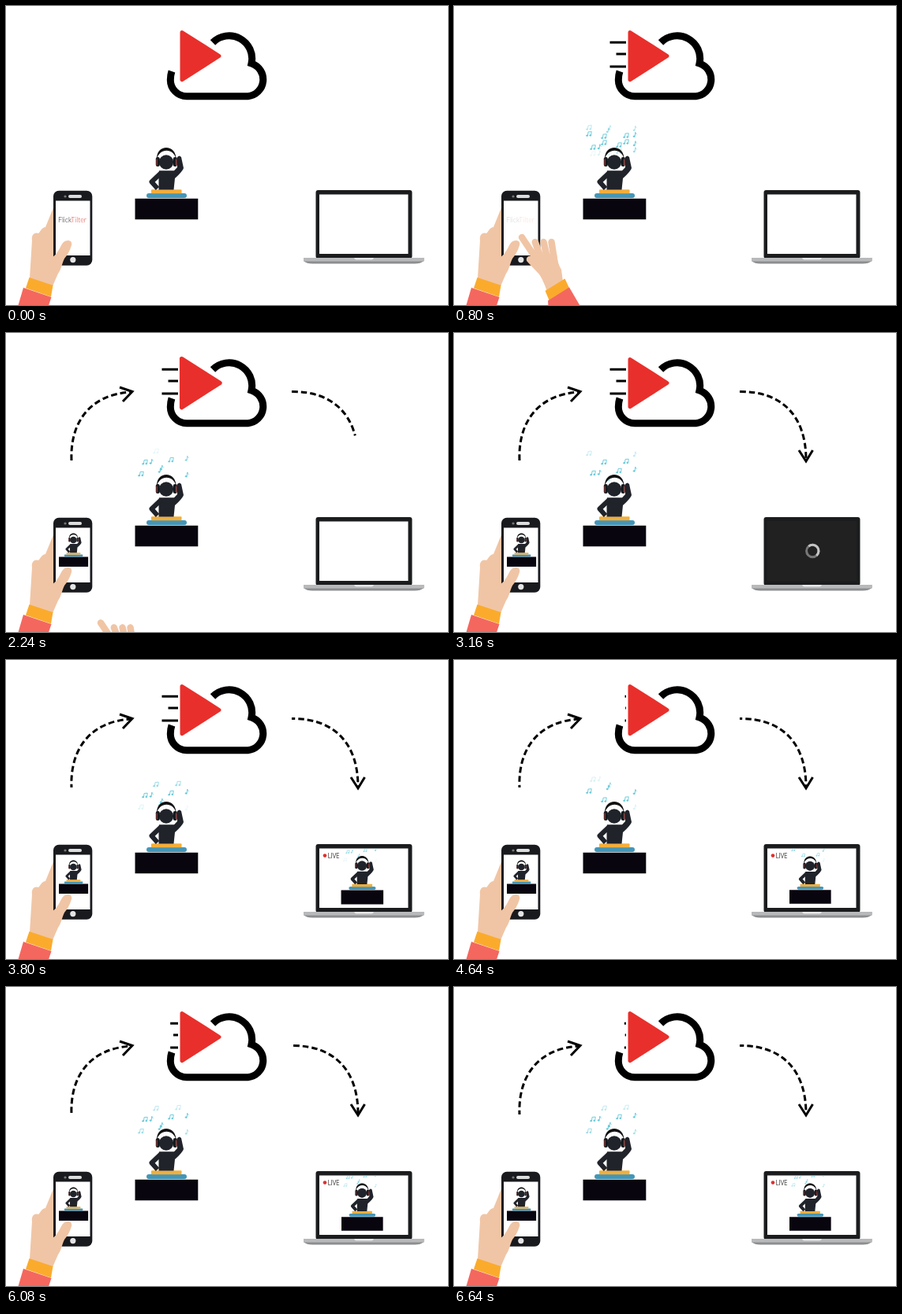
Write an HTML page that moves like this. It is 560x380 px and loops after 6.68 s.

```html
<!DOCTYPE html>
<html lang="en">
<head>
<meta charset="utf-8">
<title>Live streaming</title>
<style>
  html, body { margin: 0; width: 100%; height: 100%; overflow: hidden; background: #fff; }
  svg { display: block; width: 560px; height: 380px; }
  .name { font: 300 8.8px Lato, "Open Sans", sans-serif; }
  .live { font: 8.2px "Open Sans", Roboto, sans-serif; letter-spacing: -.3px; }
  .line { fill: none; stroke: #000; stroke-width: 3; }
  .skin { fill: #f0c5a5; }
  .finger { fill: none; stroke: #f0c5a5; stroke-width: 8.5; stroke-linecap: round; }
</style>
</head>
<body>
<svg viewBox="0 0 560 380">
  <defs>
    <g id="dj">
      <path d="M163.500 244.700h79.800v26.600h-79.800z" fill="#08050f"/>
      <rect x="178" y="238" width="51" height="6" rx="3" fill="#4596b7"/>
      <rect x="184" y="233.200" width="38.500" height="5" rx="1" fill="#f3ae3a"/>
      <g fill="#20232a">
        <path d="M194 209.300H213L217 205L216.500 193Q219 188.500 222 192L225 206Q224 210 214 219L212.500 233.500H193.500V219Z"/>
        <circle cx="203" cy="198.500" r="9.200"/>
      </g>
      <path d="M196 212.500L184.500 223.500L192 232" fill="none" stroke="#20232a" stroke-width="6" stroke-linejoin="round"/>
      <path d="M191 195C190 175 216 175 215.500 195C213 180 194 180 191 195Z" fill="#111"/>
      <rect x="189.800" y="192" width="5" height="12" rx="2.300" fill="#17181c"/>
      <rect x="211.800" y="192" width="5" height="12" rx="2.300" fill="#17181c"/>
      <path d="M191.200 194.500v8M215.400 194.500v8" stroke="#b4423c"/>
    </g>
    <g id="pair" fill="#62c8d9" stroke="#62c8d9">
      <path d="M-1.500 3V-2.800L3.300 -3.800V2" fill="none" stroke-width="1"/>
      <ellipse cx="-2.500" cy="3" rx="1.200" ry=".8"/><ellipse cx="2.300" cy="2" rx="1.200" ry=".8"/>
    </g>
    <g id="single" fill="#62c8d9" stroke="#62c8d9">
      <path d="M.5 3V-3.500Q1 -1.500 3 -.5" fill="none"/>
      <ellipse cx="-.6" cy="3" rx="1.200" ry=".9"/>
    </g>
    <clipPath id="screen"><path d="M397 239.500h112.500v75.500h-112.500z"/></clipPath>
    <mask id="mask0" maskUnits="userSpaceOnUse" x="0" y="0" width="560" height="380">
      <path id="show0" d="M83 162C81 115 105 78 159 75" pathLength="100" fill="none" stroke="#fff" stroke-width="9"/>
    </mask>
    <mask id="mask1" maskUnits="userSpaceOnUse" x="0" y="0" width="560" height="380">
      <path id="show1" d="M362 74.500C415 74 446 105 446 161" pathLength="100" fill="none" stroke="#fff" stroke-width="9"/>
    </mask>
  </defs>

  <path d="M262 46.500A29 29 0 0 1 311 73A21.500 21.500 0 0 1 306.500 114.800H229A20.800 20.800 0 0 1 208.300 94Q208.300 88 210 83" fill="none" stroke="#000" stroke-width="9"/>
  <path id="speed" class="line"/>
  <path id="play" d="M223 33.500L270 63.500L223 93.700Z" fill="#e92f2b" stroke="#e92f2b" stroke-width="5" stroke-linejoin="round"/>

  <g class="line">
    <path id="dash0" d="M83 162C81 115 105 78 159 75" mask="url(#mask0)"/>
    <path id="head0" d="M144 69L160 74.500L148 87"/>
    <path id="dash1" d="M362 74.500C415 74 446 105 446 161" mask="url(#mask1)"/>
    <path id="head1" d="M437 149L446 163L454.500 149"/>
  </g>

  <g id="notes"></g>
  <use href="#dj"/>

  <path class="skin" d="M61 254L50 281C44 282 44 287 41 289C35 287 32 292 33 298L30 346L59 356L70 322Z"/>
  <rect x="60" y="234.700" width="49.300" height="95" rx="7" fill="#191a1e"/>
  <path d="M63 247.500h43.500v69.500h-43.500z" fill="#fff"/>
  <rect x="79" y="240" width="17" height="4" rx="2" fill="#ddd"/>
  <circle cx="75" cy="242" r="1.600" fill="#777"/>
  <circle cx="84.800" cy="322.600" r="3.600" fill="#e4e4e4"/>
  <text id="name" class="name" x="66" y="275" fill="#222">Flick<tspan fill="#e0473f">Tilter</tspan></text>
  <use id="phoneDj" href="#dj" transform="translate(67 297) scale(.465) translate(-163.500 -271.500)"/>
  <path class="skin" d="M59 319C65 316 69 305 72 301C76 296 85 297 83 304C81 311 78 316 74 321C71 327 70 335 66 340L59 356L38 342Z"/>
  <path d="M29.500 345L59.500 355L57 369.500L25 358.500Z" fill="#fbab2c"/>
  <path d="M22 358L57.500 370L53.500 382H15Z" fill="#f4675f"/>

  <g id="hand">
    <path class="finger" d="M86 294L106 324M102.800 300L112 326M113.500 300L119 324M123.500 300L127.500 326M96 322L113 340"/>
    <path class="skin" d="M100 316L130 315Q131 327 136 335L138 350L118 363Q112 345 104 335Z"/>
    <path d="M115.500 362L140.500 346.500L146 358.500L121 375Z" fill="#fbab2c"/>
    <path d="M119 374.500L146 357.500L162 385V470H126Z" fill="#f4675f"/>
  </g>

  <rect x="392.500" y="234" width="122" height="87" rx="3" fill="#1b1c1e"/>
  <path d="M397 239.500h112.500v75.500h-112.500z" fill="#fff"/>
  <g id="cast" clip-path="url(#screen)">
    <g id="castDj">
      <g transform="translate(425 310) scale(.66) translate(-163.500 -271.500)">
        <g id="castNotes" opacity=".8"></g>
        <use href="#dj"/>
      </g>
    </g>
    <circle cx="404" cy="248.600" r="2.300" fill="#e0302c"/>
    <text class="live" x="407.500" y="251.600" fill="#444">LIVE</text>
  </g>
  <g id="dark">
    <path d="M396.500 239h113.500v76.500h-113.500z" fill="#212121"/>
    <g fill="none" stroke-width="3">
      <circle cx="454.300" cy="277" r="7.700" stroke="#777"/>
      <path id="spin" d="M454.300 269.300A7.700 7.700 0 0 1 454.300 284.700" stroke="#c4c4c4"/>
    </g>
  </g>
  <path d="M377 320H529.500V324Q525 327.500 518 327.500H388Q381 327.500 377 324Z" fill="#8d8e8f"/>
  <path d="M377 320H529.500V324.500H377Z" fill="#b8b9ba"/>
  <path d="M441 320h25q-1 2.500-3 2.500h-19q-2 0-3-2.500z" fill="#e6e6e6"/>
</svg>

<script>
const LOOP = 6680, BEAT = LOOP / 10, RISE = LOOP / 12, STEP = 40;
const $ = id => document.getElementById(id);
const clamp = v => Math.max(0, Math.min(1, v));
const ramp = (t, a, b) => clamp((t - a) / (b - a));
const ease = v => v * v * (3 - 2 * v);
const set = (id, key, value) => $(id).setAttribute(key, value);

// Piecewise linear track of [time, value] steps.
function track(t, steps) {
  let value = steps[0][1];
  for (let i = 1; i < steps.length; i++) {
    const [a, from] = steps[i - 1], [b, to] = steps[i];
    if (t >= a) value = from + (to - from) * ramp(t, a, b);
  }
  return value;
}

// x, phase, kind
const notes = [
  [176, .623, 0], [184, .648, 1], [195, .373, 1], [209, .698, 0], [218, .998, 0],
  [229, .748, 1], [190, .973, 0], [229, .23, 1], [171, .25, 0], [197, .45, 1]
];

function addNotes(parent) {
  return [0, .2].flatMap(shift => notes.map(([x, phase, kind]) => {
    const el = document.createElementNS('http://www.w3.org/2000/svg', 'use');
    el.setAttribute('href', kind ? '#single' : '#pair');
    $(parent).append(el);
    return { el, x, phase: phase + shift, early: shift > 0 };
  }));
}
const allNotes = [...addNotes('notes'), ...addNotes('castNotes')];

function drawNotes(t) {
  const level = ramp(t, 80, 600);
  for (const { el, x, phase, early } of allNotes) {
    const p = (t / RISE + phase) % 1;
    const fade = ramp(p, .03, .25) * (1 - .85 * ramp(p, .7, 1));
    el.setAttribute('transform', `translate(${x} ${190 - 40 * p}) rotate(8) scale(.85)`);
    el.setAttribute('opacity', level * fade * (early ? 1 - ramp(t, 1700, 1900) : 1));
  }
}

function drawPlay(t) {
  const p = t % BEAT;
  const size = 1 + .13 * Math.sin(Math.PI * ramp(p, 190, 460)) ** 2;
  set('play', 'transform', `translate(238 63.500) scale(${size}) translate(-238 -63.500)`);
  const k = ramp(p, 20, 120) * (1 - ramp(p, 530, 640));
  const dash = (y, len) => `M218 ${y}h${-len * k}`;
  set('speed', 'd', k ? dash(46.3, 20.5) + dash(61, 12.5) + dash(77, 20.5) : '');
}

function drawArrow(i, t, start) {
  const k = ramp(t, start, start + 335);
  set('show' + i, 'stroke-dasharray', `${k * 100} 300`);
  set('dash' + i, 'stroke-dasharray', '7.6 4');
  set('dash' + i, 'stroke-dashoffset', -11.6 * (t - 2240) / 920);
  set('dash' + i, 'opacity', k > 0 ? 1 : 0);
  set('head' + i, 'opacity', k < 1 ? 0 : 1);
}

function drawHand(t) {
  const away = 1 - ease(ramp(t, 200, 800)) + ease(ramp(t, 1700, 2480));
  set('hand', 'transform', `translate(${44 * away} ${96 * away})`);
  set('name', 'opacity', 1 - ramp(t, 560, 860));
  set('phoneDj', 'opacity', ramp(t, 1640, 1900));
}

function drawLaptop(t) {
  set('dark', 'opacity', ramp(t, 2360, 2520) * (1 - ramp(t, 3320, 3440)));
  set('spin', 'transform', `rotate(${(t - 3160) * .36 - 40} 454.300 277)`);
  set('cast', 'opacity', ramp(t, 3400, 3480));
  const size = track(t, [[3400, .6], [3560, 1.1], [3760, 1.02], [4000, 1]]);
  set('castDj', 'transform', `translate(451 279) scale(${size}) translate(-451 -279)`);
}

const begin = performance.now();
function frame() {
  const now = (performance.now() - begin) % LOOP;
  const t = now < 80 ? 0 : Math.floor(now / STEP) * STEP;
  drawPlay(t);
  drawNotes(t);
  drawArrow(0, t, 1515);
  drawArrow(1, t, 1980);
  drawHand(t);
  drawLaptop(t);
  requestAnimationFrame(frame);
}
frame();
</script>
</body>
</html>
```
